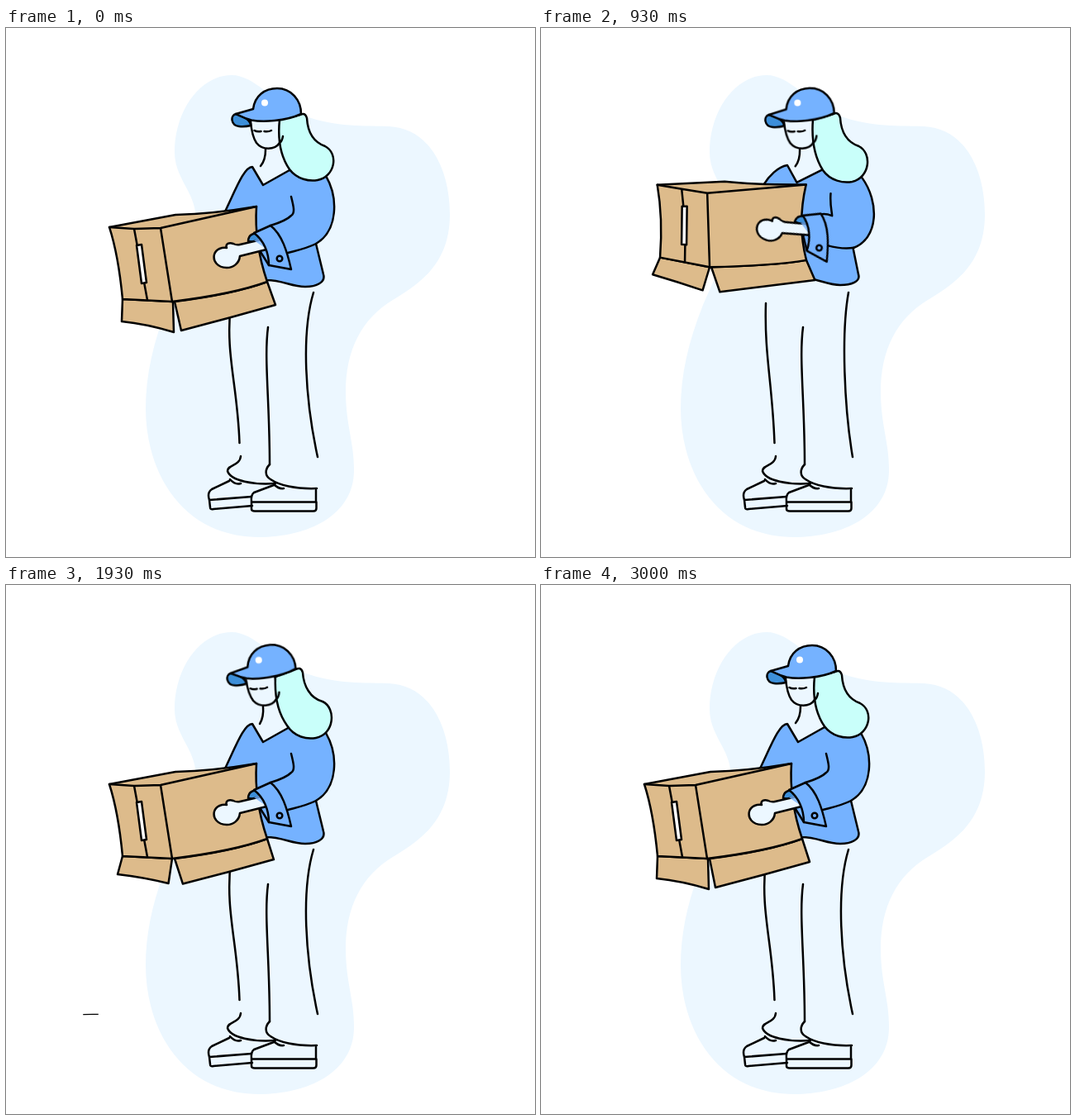
An HTML page without scripts for the animation above (3070 ms loop, 640x640 px).

```html
<!DOCTYPE html>
<html lang="en">
<head>
<meta charset="utf-8">
<title>Lifting a parcel</title>
<style>
html, body { margin: 0; width: 100%; height: 100%; overflow: hidden; background: #fff; }
svg { display: block; width: 100vw; height: 100vh; }
.ink { fill: none; stroke: #000; stroke-width: 2.5; stroke-linecap: round; stroke-linejoin: round; }
.pale { fill: #ecf7ff; }
.shirt { fill: #75b2ff; }
.shade { fill: #3d8fd9; }
.card { fill: #ddbb8b; }
.mint { fill: #c9fffa; }
.white { fill: #fff; }
.ink * { animation: 3.07s infinite cubic-bezier(.35,.2,.65,.8); }

/* box */
#box { animation-name: box; }
@keyframes box {
  0%, 51.1%, 100% { d: path("M125 241L205 226Q250 225 303 216Q300 260 316 307Q275 322 201 331L141 328Q136 275 125 241Z"); }
  11.7% { d: path("M130 221L210 209Q255 209 309 204Q304 250 317 295Q276 306 202 314L141 307Q141 252 130 221Z"); }
  23.1% { d: path("M136 199L217 192Q260 195 316 192Q308 240 320 284Q278 292 203 296L143 287Q145 235 136 199Z"); }
  37.1% { d: path("M145 181L227 180Q255 185 325 187Q311 235 322 278Q280 284 205 283L145 269Q150 225 145 181Z"); }
}
#edges { animation-name: edges; }
@keyframes edges {
  0%, 51.1%, 100% { d: path("M125 241L155 243L187 242L303 216M187 242L201 331M155 243Q163 286 171 329"); }
  11.7% { d: path("M130 221L160 223L192 225L309 204M192 225L202 314M160 223Q168 266 171 310"); }
  23.1% { d: path("M136 199L166 203L197 207L316 192M197 207L203 296M166 203Q173 247 173 291"); }
  37.1% { d: path("M145 181L174 187L205 193L325 187M205 193L205 283M174 187Q178 232 175 275"); }
}
#slot { animation-name: slot; }
@keyframes slot {
  0%, 51.1%, 100% { d: path("M158 263L164 262L170 308L164 309Z"); }
  11.7% { d: path("M162 243L168 243L172 289L166 290Z"); }
  23.1% { d: path("M167 224L173 224L174 270L168 270Z"); }
  37.1% { d: path("M174 208L180 208L178 255L172 254Z"); }
}
#flapL { animation-name: flapL; }
@keyframes flapL {
  0%, 97.7%, 100% { d: path("M141 328L202 331L203 368Q170 358 140 355Z"); }
  11.7% { d: path("M141 307L202 314L202 350Q170 340 139 334Z"); }
  23.1% { d: path("M143 287L203 296L194 322Q165 313 133 306Z"); }
  37.1% { d: path("M145 269L205 283L197 313Q167 302 137 291Z"); }
  51.1% { d: path("M141 328L201 331L192 355Q162 349 130 345Z"); }
  74.6% { d: path("M141 328L201 331L201 367Q170 358 140 355Z"); }
}
#flapR { animation-name: flapR; }
@keyframes flapR {
  0%, 100% { d: path("M204 331Q275 322 316 307L326 335Q270 351 212 366Z"); }
  11.7% { d: path("M204 314Q276 306 317 295L329 324Q272 337 214 349Z"); }
  23.1% { d: path("M205 296Q278 292 320 284L333 305Q276 313 219 323Z"); }
  37.1% { d: path("M207 283Q280 284 322 278L330 305Q272 311 214 316Z"); }
  51.1% { d: path("M204 331Q275 322 316 307L331 327Q276 343 221 357Z"); }
  74.6% { d: path("M204 331Q275 322 316 307L317 337Q263 352 207 366Z"); }
  97.7% { d: path("M204 331Q275 322 316 307L325 335Q269 351 211 366Z"); }
}

/* jumper and arm */
#torso { animation-name: torso; }
@keyframes torso {
  0%, 51.1%, 100% { d: path("M298 168C288 168 278 195 265 222L300 290L315 305C335 305 345 313 362 313C375 313 387 308 384 298L375 261C402 245 402 205 387 179L343 172L311 190Z"); }
  11.7% { d: path("M298 168C290 168 281 190 271 210L300 290L318 304C335 306 345 313 362 313C375 313 387 308 384 298L375 261C409 245 410 205 390 178L342 172L311 190Z"); }
  23.1% { d: path("M298 166C285 168 272 180 265 194L300 285L330 304C342 307 350 311 362 311C375 311 387 307 384 298L376 259C412 240 411 205 392 178L341 171L310 188Z"); }
  37.1% { d: path("M298 166C288 168 279 178 273 186L300 285L330 304C342 307 350 311 362 311C375 311 387 307 384 298L379 273C406 268 408 215 385 184L339 172L309 186Z"); }
}
#elbow { animation-name: elbow; }
@keyframes elbow {
  0%, 51.1%, 100% { d: path("M345 204C348 216 350 224 345 227C340 232 330 236 320 239M375 261C363 267 352 269 341 272"); }
  11.7% { d: path("M347 201C349 214 350 222 345 226C340 229 333 230 327 231M376 261C364 264 354 266 344 267"); }
  23.1% { d: path("M351 196C352 210 352 218 348 222C343 222 338 222 333 223M378 258C366 260 356 261 346 260"); }
  37.1% { d: path("M350 204C347 218 352 226 356 232C350 228 346 227 343 228M379 273C368 275 356 270 347 266"); }
}
#arm { animation-name: arm; transform-origin: 267px 277px; }
@keyframes arm {
  0%, 51.1%, 100% { transform: translate(0, 0) rotate(0deg); }
  11.7% { transform: translate(3.5px, -13px) rotate(5deg); }
  23.1% { transform: translate(6.5px, -28.5px) rotate(11deg); }
  37.1% { transform: translate(12px, -37px) rotate(25deg); }
}

/* head */
#head { animation: nod 3.07s infinite cubic-bezier(.37,0,.63,1); transform-origin: 315px 195px; }
@keyframes nod {
  0%, 13%, 98%, 100% { transform: rotate(0deg); }
  55.4%, 64.5% { transform: rotate(-4deg); }
}
#cap { animation: nod 3.07s infinite cubic-bezier(.37,0,.63,1); transform-origin: 315px 195px; }
#hair { animation-name: hair; }
@keyframes hair {
  0%, 98%, 100% { d: path("M331 111C329 130 330 152 343 171C352 183 367 186 377 184C398 180 403 152 386 143C372 138 365 126 364 109C362 102 358 104 356 105Z"); }
  23.1% { d: path("M330 111C328 130 329 152 342 172C351 185 367 188 377 186C398 181 402 152 385 143C371 138 364 126 363 109C361 102 357 104 355 105Z"); }
  37.1% { d: path("M328 111C327 130 328 152 340 172C349 185 365 188 376 186C398 181 400 151 384 143C369 138 362 124 361 108C359 101 355 102 353 103Z"); }
  51.1%, 64% { d: path("M326 111C325 130 327 152 340 170C349 184 364 187 375 185C397 181 400 149 383 141C368 137 360 122 359 106C357 99 353 101 350 102Z"); }
  74.6% { d: path("M327 111C326 130 328 151 340 169C349 182 365 185 376 183C397 179 400 149 383 140C368 136 361 122 360 106C358 100 354 102 351 103Z"); }
}
#neck { animation-name: neck; }
@keyframes neck {
  0%, 20%, 98%, 100% { d: path("M314 147Q314 160 308 167"); }
  51.1%, 68% { d: path("M311 147Q312 160 307 168"); }
}

/* legs */
#legs { animation-name: legs; }
@keyframes legs {
  0%, 11.7%, 51.1%, 100% { d: path("M272 333C265 395 280 430 282.5 502M372 320C357 370 362 450 377 519"); }
  23.1%, 37.1% { d: path("M272 333C270 395 280 430 282.5 502M372 320C363 370 367 460 377 519"); }
}

/* air streaks */
.air { fill: none; stroke: #000; stroke-width: 1.3; stroke-dasharray: 18.5 220; stroke-dashoffset: 18.5; }
.air path { animation: 3.07s infinite linear; }
#air1 { animation-name: air1; }
#air2 { animation-name: air2; }
#air3 { animation-name: air3; }
#air4 { animation-name: air4; }
@keyframes air1 { 0%, 36.3% { stroke-dashoffset: 18.5; } 48.5%, 100% { stroke-dashoffset: -90; } }
@keyframes air2 { 0%, 48.5% { stroke-dashoffset: 18.5; } 62%, 100% { stroke-dashoffset: -100; } }
@keyframes air3 { 0%, 50.3% { stroke-dashoffset: 18.5; } 67%, 100% { stroke-dashoffset: -145; } }
@keyframes air4 { 0%, 72% { stroke-dashoffset: 18.5; } 85%, 100% { stroke-dashoffset: -90; } }
</style>
</head>
<body>
<svg viewBox="0 0 640 640">
  <path class="pale" d="M273 57C300 57 325 90 352 103C395 120 425 118 463 119C512 121 537 170 537 226C537 285 500 310 468 329C430 352 411 390 411 440C411 480 421 500 421 535C421 590 365 616 306 616C215 616 169 540 169 460C169 420 178 380 196 335C215 290 234 260 229 222C225 195 204 180 204 150C204 100 235 57 273 57Z"/>

  <g class="air">
    <path id="air1" d="M157 382Q118 364 84 354"/>
    <path id="air2" d="M167 396.500C148 388 120 374 80 364"/>
    <path id="air3" d="M215.500 513.500C190 527 140 517 80 520"/>
    <path id="air4" d="M137.500 501C118 511 90 509 59 511"/>
  </g>

  <g class="ink">
    <path id="legs"/>
    <path d="M317 362C312 400 319 450 319 528"/>
    <path d="M284 518C283 530 268 528 268 536C272 548 300 553 326 551"/>
    <path d="M319 528C313 534 313 542 320 546C330 553 350 558 376 557"/>
    <path d="M270 548L249 558Q243 562 246 571L297 567M246 571L247 580Q247 583 251 582L298 578M271 546Q277 553 284 551"/>
    <path d="M324 553L300 562Q296 565 297 573.500H375V559M297 573.500V582Q297 584.500 301 584.500H372Q375.500 584.500 375.500 581V573.500M324 552Q330 558 336 557"/>

    <path id="torso" class="shirt"/>
    <path id="elbow"/>
    <path id="neck"/>

    <g id="head">
      <path class="pale" d="M296 113C297 125 299 133 303 139C310 148 325 148 331 139C334 136 335 133 335 130L331 111"/>
      <path d="M300.500 124Q304 126 308.500 125M312.500 125Q317 126 321 124"/>
    </g>
    <path id="hair" class="mint"/>
    <g id="cap">
      <path d="M335 131Q334 137 331 139"/>
      <path class="shade" d="M278 104C271 106 272 118 282 119C288 119.500 292 119 296 118C296 112 288 107 278 104Z"/>
      <path class="shirt" d="M278 104L299 98C301 82 313 73 328 73C345 73 357 87 357 104C338 113 310 114 297 111.500C288 109.500 283 106 278 104Z"/>
      <circle cx="313" cy="90.500" r="4" fill="#fff" stroke="none"/>
    </g>

    <path id="flapL" class="card"/>
    <path id="flapR" class="card"/>
    <path id="box" class="card"/>
    <path id="edges"/>
    <path id="slot" class="white"/>

    <g id="arm">
      <path class="shade" d="M293 258C293 250 300 247 306 250L316 262L300 259Z"/>
      <path class="pale" stroke="none" d="M283 262L311 255L317 268L283 276Z"/>
      <path class="pale" d="M315 268L283 276C282 285 275 290 267 290C256 290 250 282 252 274C254 267 262 265 267 266C265 261 270 259 275 261Q279 263 283 262L309 256"/>
      <path class="shirt" stroke="none" opacity=".8" d="M300 257L311 253L316 268Z"/>
      <path class="shirt" d="M300 248L320 239C334 250 340 270 345 292L318 287C318 272 312 257 300 248Z"/>
      <path d="M308 271L318 287"/>
      <circle cx="331" cy="279" r="3.300"/>
    </g>
  </g>
</svg>
</body>
</html>
```
